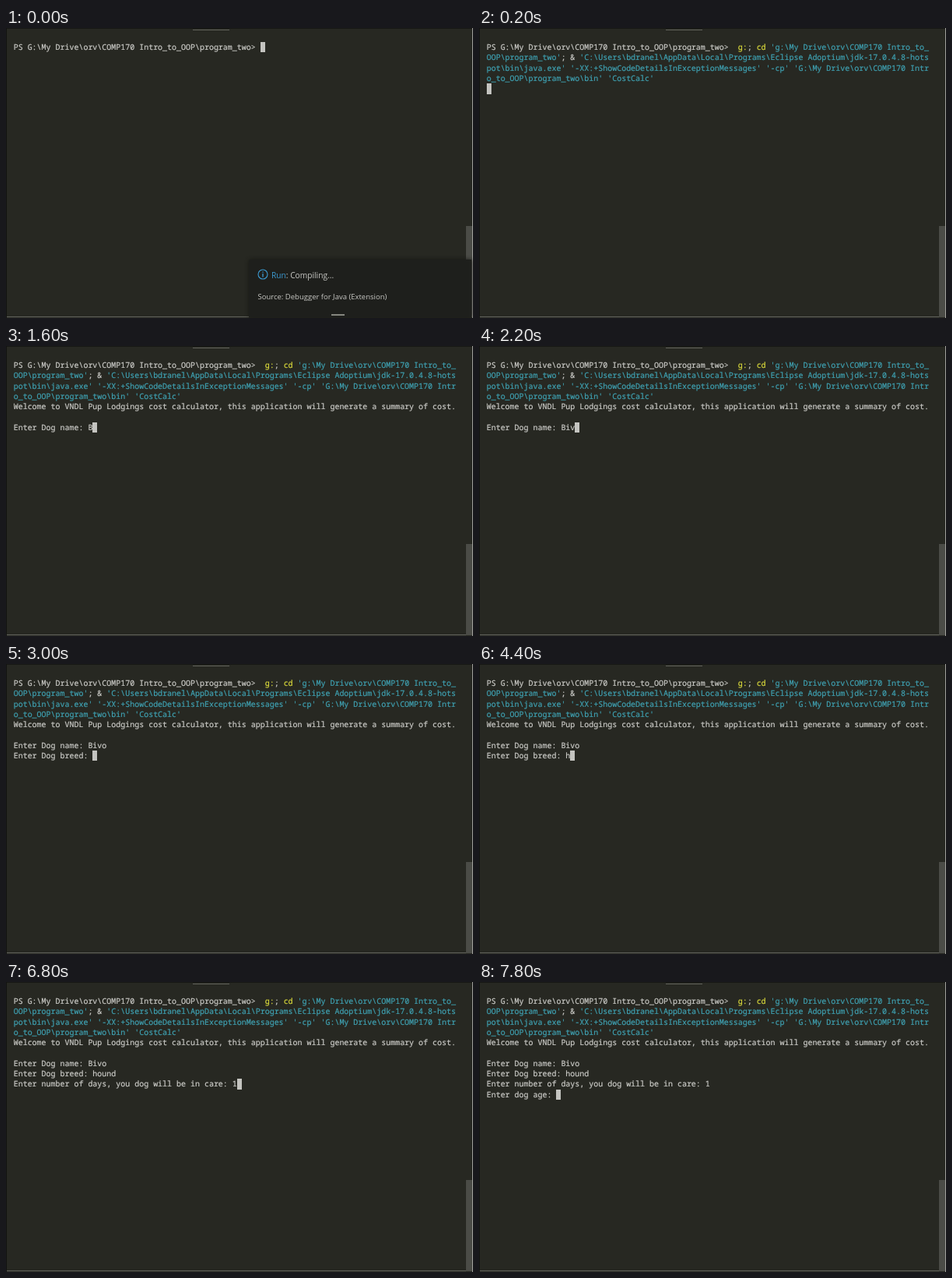
Recreate the animation shown at these times as an HTML page. Size 600 px wide and 372 px high, loop 8 s.

```html
<!DOCTYPE html>
<html lang="en">
<head>
<meta charset="utf-8">
<title>Terminal session</title>
<style>
html, body { margin: 0; width: 100%; height: 100%; overflow: hidden; background: #272822; }
#stage { position: relative; width: 600px; height: 372px; overflow: hidden; background: #272822; }
#stage > * { position: absolute; }
#term { left: 9.7px; top: 18.2px; margin: 0; color: #ccccc8; font: 9.97px/13.28px "Noto Sans Mono", monospace; white-space: pre;
  text-rendering: geometricPrecision; -webkit-text-stroke: .2px; }
#term i { font-style: normal; color: #3fa2b3; }
#term u { text-decoration: none; color: #dcdc3c; }
#term b { position: absolute; width: 6px; height: 13.3px; background: #c4c4c0; }
.left { left: 0; top: 0; width: 1px; height: 372px; background: #121310; }
.right { left: 599px; top: 0; width: 1px; height: 372px; background: #a0a09c; }
.top { left: 0; top: 0; width: 600px; height: 1px; background: #161714; }
.bottom { left: 0; top: 370px; width: 600px; height: 1px; background: #62635d; }
.handle { left: 240px; top: 2px; width: 47px; height: 1px; background: #62635c; }
.scroll { left: 591px; top: 254px; width: 8px; height: 117px; background: #4b4c47; }
#toast { left: 312px; top: 297px; width: 286px; height: 74px; background: #1e1f1c; border-radius: 3px 0 0 0;
  box-shadow: 0 0 5px #161713; color: #c8c8c4; font: 10.2px/14px "Open Sans", sans-serif; white-space: nowrap; }
#toast > * { position: absolute; }
#toast svg { left: 11px; top: 12px; }
.msg { left: 29px; top: 13px; }
.msg span { color: #3c9bd2; }
.from { left: 11.5px; top: 41px; font-size: 9.5px; }
.dash { left: 106px; top: 70px; width: 17px; height: 2px; background: #85867f; }
</style>
</head>
<body>
<div id="stage">
  <div class="top"></div>
  <div class="bottom"></div>
  <div class="left"></div>
  <div class="right"></div>
  <div class="handle"></div>
  <div class="scroll"></div>
  <pre id="term"></pre>
  <div id="toast">
    <svg width="14" height="14" fill="none" stroke="#3c9bd2">
      <circle cx="7" cy="7" r="6" stroke-width="1.1"/>
      <path d="M7 3.5v1.3M7 6v4.5" stroke-width="1.3"/>
    </svg>
    <div class="msg"><span>Run</span>: Compiling...</div>
    <div class="from">Source: Debugger for Java (Extension)</div>
    <div class="dash"></div>
  </div>
</div>
<script>
const LOOP = 8000;
const term = document.getElementById('term');
const toast = document.getElementById('toast');

const prompt = String.raw`PS G:\My Drive\orv\COMP170 Intro_to_OOP\program_two> `;
const command = String.raw` <u>g:</u>; <u>cd</u> <i>'g:\My Drive\orv\COMP170 Intro_to_
OOP\program_two'</i>; &amp; <i>'C:\Users\bdranel\AppData\Local\Programs\Eclipse Adoptium\jdk-17.0.4.8-hots
pot\bin\java.exe' '-XX:+ShowCodeDetailsInExceptionMessages' '-cp' 'G:\My Drive\orv\COMP170 Intr
o_to_OOP\program_two\bin' 'CostCalc'</i>
`;

// Each step appends its output at the given time (ms)
const steps = [
  [0, prompt],
  [200, command],
  [400, 'Welcome to VNDL Pup Lodgings cost calculator, this application will generate a summary of cost.\n\nEnter Dog name: '],
  [1600, 'B'], [1800, 'i'], [2200, 'v'], [2400, 'o'], [2800, '\n'],
  [3000, 'Enter Dog breed: '],
  [4400, 'h'], [4600, 'ou'], [5000, 'nd'],
  [5400, '\nEnter number of days, you dog will be in care: '],
  [6800, '1'],
  [7800, '\nEnter dog age: ']
];

let shown = -1;
function draw(now) {
  const t = now % LOOP;
  const done = steps.filter(([at]) => at <= t);
  if (done.length === shown) return;
  shown = done.length;
  term.innerHTML = done.map(([, text]) => text).join('') + '<b></b>';
  toast.style.display = t < 200 ? 'block' : 'none';
}

const start = performance.now();
function tick() {
  draw(performance.now() - start);
  requestAnimationFrame(tick);
}
tick();
</script>
</body>
</html>
```
